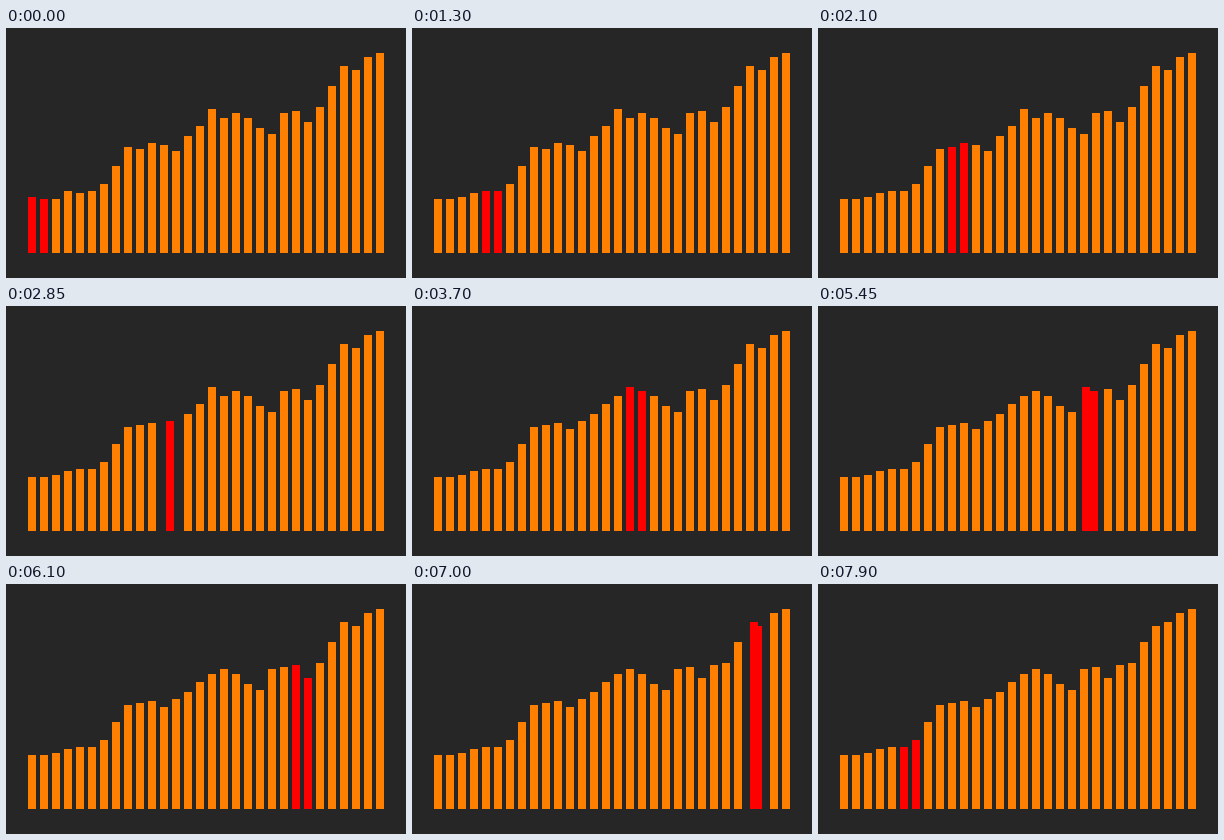
An HTML page with a canvas that plays this animation: 400 px wide and 250 px high, repeating every 8000 ms.

```html
<!DOCTYPE html>
<html lang="en">
<head>
<meta charset="utf-8">
<title>Bubble sort</title>
<style>
html, body { margin: 0; width: 100%; height: 100%; overflow: hidden; background: #262626; }
canvas { display: block; }
</style>
</head>
<body>
<canvas id="stage" width="400" height="250"></canvas>
<script>
const LOOP = 8000, LEFT = 22, PITCH = 12, WIDTH = 8, BASE = 225;
const TICK = 50, MOVES = 6;
// The values to sort, as bar heights
const values = [
  56, 54, 54, 62, 60, 62, 69, 87, 106, 104, 110, 108, 102, 117, 127,
  144, 135, 140, 135, 125, 119, 140, 142, 131, 146, 167, 187, 183, 196, 200
];
const ctx = document.getElementById("stage").getContext("2d");

// Each pair is compared for two ticks, or three when it is about to swap
function bubbleSort(values) {
  const steps = [], bars = values.slice();
  let time = 0;
  const add = (pair, shift, ticks) => {
    steps.push({ time, pair, shift, bars: bars.slice() });
    time += ticks * TICK;
  };
  for (let last = bars.length - 1; time < LOOP; last--) {
    for (let i = 0; i < last; i++) {
      const swap = bars[i] > bars[i + 1];
      add(i, 0, swap ? 3 : 2);
      if (!swap) continue;
      for (let k = 1; k < MOVES; k++) add(i, k * PITCH / MOVES, 1);
      [bars[i], bars[i + 1]] = [bars[i + 1], bars[i]];
    }
  }
  return steps;
}

function bar(i, height, shift, color) {
  ctx.fillStyle = color;
  ctx.fillRect(LEFT + i * PITCH + shift, BASE - height, WIDTH, height);
}

function draw({ bars, pair, shift }) {
  ctx.clearRect(0, 0, 400, 250);
  bars.forEach((h, i) => {
    if (i === pair) bar(i, h, shift, "#ff0000");
    else if (i === pair + 1) bar(i, h, -shift, "#ff0000");
    else bar(i, h, 0, "#ff8000");
  });
}

const steps = bubbleSort(values);
const start = performance.now();

function frame() {
  const t = (performance.now() - start) % LOOP;
  draw(steps.findLast(step => step.time <= t));
  requestAnimationFrame(frame);
}
frame();
</script>
</body>
</html>
```
